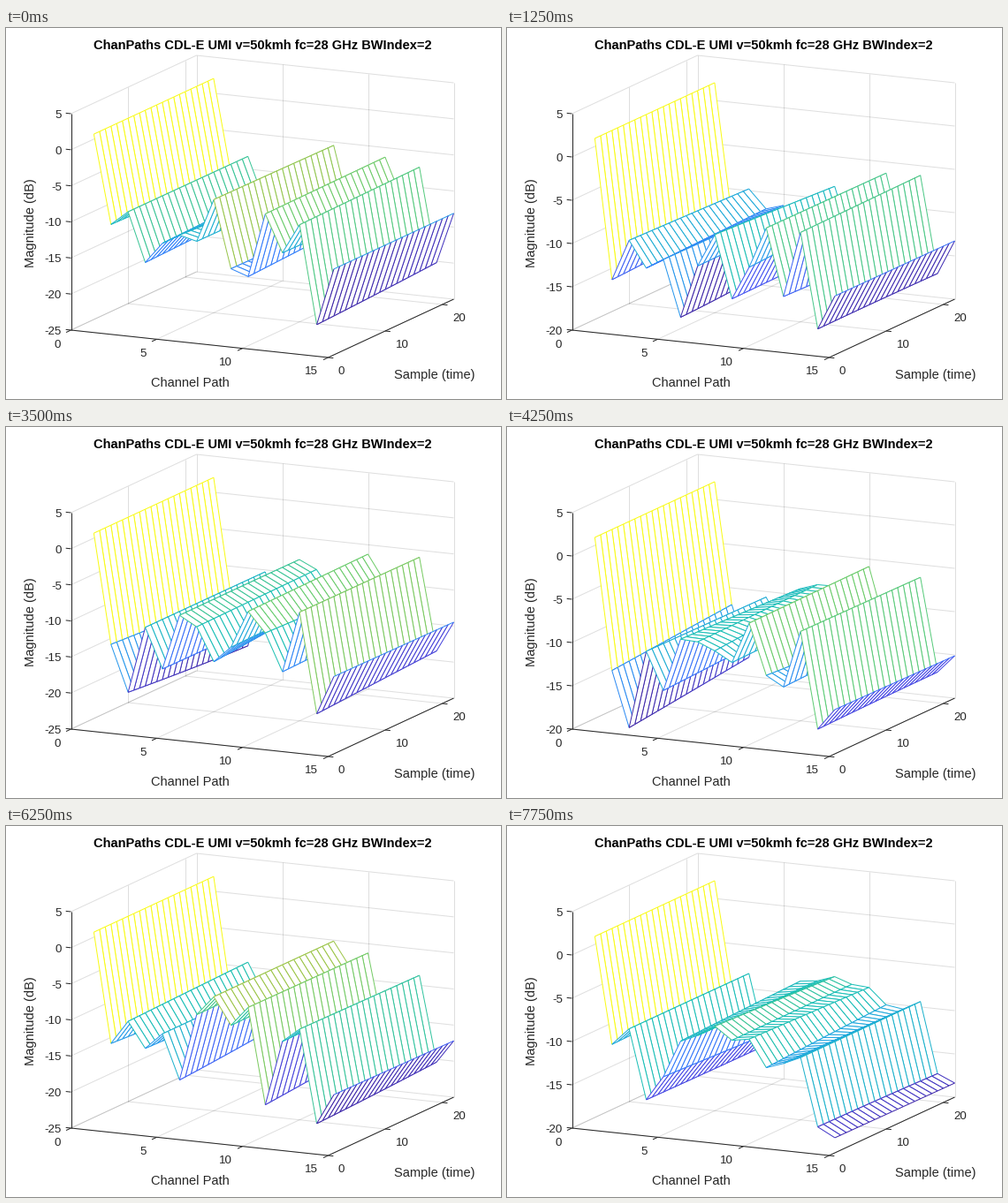
Recreate the animation shown at these times as a matplotlib script. Size 560 px wide and 420 px high, loop 8 s.

```python
import numpy as np
import matplotlib.pyplot as plt
from matplotlib.animation import FuncAnimation
from matplotlib.collections import LineCollection, PolyCollection
from matplotlib.colors import LinearSegmentedColormap

W, H, DPI = 560, 420, 100
FRAMES, STEP = 32, 250
SAMPLES, TOP = 22, 5
PX = 72 / DPI  # points per pixel
INK = "#262626"
GRID = (.15, .15, .15, .15)
PARULA = LinearSegmentedColormap.from_list("parula", [
    "#3e26a8", "#484df0", "#327cfc", "#20a5e3", "#19bfb6",
    "#64cd6f", "#d1bf27", "#fbd42d", "#f9fb15"])

plt.rcParams["font.family"] = "Liberation Sans"
plt.rcParams["axes.unicode_minus"] = False

# Each path is a pair of rays that beat against each other:
# mean level in dB, swing, time of a null and beat period in frames.
RAYS = [
    (2.05, 0, 0, 1),  # line of sight, no fading
    (-11.6, .45, 4.5, 11),
    (-11, .9, 15.5, 31),
    (-12.3, .6, 32, 36),
    (-12.8, .5, 14.5, 21),
    (-10.6, .8, 4.8, 19.5),
    (-9.3, .4, 3, 46),
    (-7.8, .85, 12, 27),
    (-10.4, .65, 3, 60),
    (-8.4, .85, -2.5, 46),
    (-9, .93, 23.6, 40),
    (-12, .55, 10, 36),
    (-7.2, .4, 31, 40),
    (-18.8, .45, 11.7, 12.6),
    (-15, .55, 34, 66),
]
LEVEL, SWING, NULL, PERIOD = np.array(RAYS).T
PATHS = len(RAYS)


def gains(t):
    """Gain in dB of every path at the times t (one row per time)."""
    beat = np.cos(2 * np.pi * (t[:, None] - NULL) / PERIOD)
    return LEVEL + 10 * np.log10(1 - SWING * beat)


def project(x, y, z, low):
    """Orthographic view: axis units to stage pixels."""
    u = 73.5 + 19.4 * x + 142 / 22 * y
    v = 342 + 31 / 15 * x - 3 * y - 245 * (z - low) / (TOP - low)
    return np.stack(np.broadcast_arrays(u, v), axis=-1)


def segment(a, b, low):
    return [project(*a, low), project(*b, low)]


def mesh(z, low):
    """Faces and edges as polygons, far to near, with their edge colours."""
    x, y = np.meshgrid(np.arange(1, PATHS + 1), np.arange(1, SAMPLES + 1))
    p = project(x, y, z, low)
    rgba = PARULA((z - z.min()) / (z.max() - z.min()))
    clear = np.zeros(4)
    polys, colors = [], []
    for j in range(SAMPLES - 2, -1, -1):
        for i in range(PATHS - 1):
            a, b, c, d = (j, i), (j, i + 1), (j + 1, i + 1), (j + 1, i)
            polys.append([p[a], p[b], p[c], p[d]])
            colors.append(clear)
            for m, n in ((d, c), (a, d), (b, c), (a, b)):
                polys.append([p[m], p[n], p[n], p[m]])
                colors.append(rgba[m])
    return np.array(polys), np.array(colors)


def grid_lines(low):
    lines = []
    for x in (0, 5, 10, 15):
        lines.append(segment((x, 0, low), (x, 22, low), low))
        lines.append(segment((x, 22, low), (x, 22, TOP), low))
    for y in (0, 10, 20):
        lines.append(segment((0, y, low), (15, y, low), low))
        lines.append(segment((0, y, low), (0, y, TOP), low))
    for z in range(low, TOP + 1, 5):
        lines.append(segment((0, 0, z), (0, 22, z), low))
        lines.append(segment((0, 22, z), (15, 22, z), low))
    return lines


def axis_lines(low):
    lines = [segment((0, 0, low), (0, 0, TOP), low),
             segment((0, 0, low), (15, 0, low), low),
             segment((15, 0, low), (15, 22, low), low)]
    for x in (0, 5, 10, 15):
        lines.append(segment((x, 0, low), (x, -.85, low), low))
    for y in (0, 10, 20):
        lines.append(segment((15, y, low), (15.3, y, low), low))
    for z in range(low, TOP + 1, 5):
        lines.append(segment((0, 0, z), (-.3, 0, z), low))
    return lines


fig = plt.figure(figsize=(W / DPI, H / DPI), dpi=DPI, facecolor="white")
ax = fig.add_axes([0, 0, 1, 1])
ax.set_xlim(0, W)
ax.set_ylim(H, 0)
ax.axis("off")


def label(x, y, text, px=14.67, ha="center", color=INK, **kw):
    return ax.text(x, y, text, fontsize=px * PX, ha=ha, va="baseline",
                   color=color, **kw)


label(290.5, 24.5, "ChanPaths CDL-E UMI v=50kmh fc=28 GHz BWIndex=2",
      color="black", weight="bold")
label(208.5, 405.5, "Channel Path")
label(485, 397.5, "Sample (time)")
label(32, 221, "Magnitude (dB)", rotation=90, rotation_mode="anchor")

for x in (0, 5, 10, 15):
    u, v = project(x, 0, 0, 0)
    label(u - 11.5, v + 19.5, str(x), 13.33, "right")
for y in (0, 10, 20):
    u, v = project(15, y, 0, 0)
    label(u + 11.5, v + 18.5, str(y), 13.33, "left")
z_labels = [label(63, 0, str(z), 13.33, "right") for z in range(TOP, -26, -5)]

grid = LineCollection([], colors=[GRID], linewidths=PX, zorder=1)
surface = PolyCollection([], facecolors="white", linewidths=PX,
                         joinstyle="round", zorder=2)
axes = LineCollection([], colors=INK, linewidths=PX, zorder=3)
for art in (grid, surface, axes):
    ax.add_collection(art, autolim=False)


def draw(k):
    z = gains(k + np.arange(SAMPLES) / SAMPLES)
    low = -25 if z.min() < -20 else -20
    polys, colors = mesh(z, low)
    surface.set_verts(polys)
    surface.set_edgecolor(colors)
    grid.set_segments(grid_lines(low))
    axes.set_segments(axis_lines(low))
    for n, text in enumerate(z_labels):
        level = TOP - 5 * n
        text.set_visible(level >= low)
        text.set_y(project(0, 0, level, low)[1] + 5)
    return [grid, surface, axes, *z_labels]


anim = FuncAnimation(fig, draw, frames=FRAMES, interval=STEP,
                     init_func=lambda: draw(0), repeat=True, repeat_delay=0)
plt.show()
```
